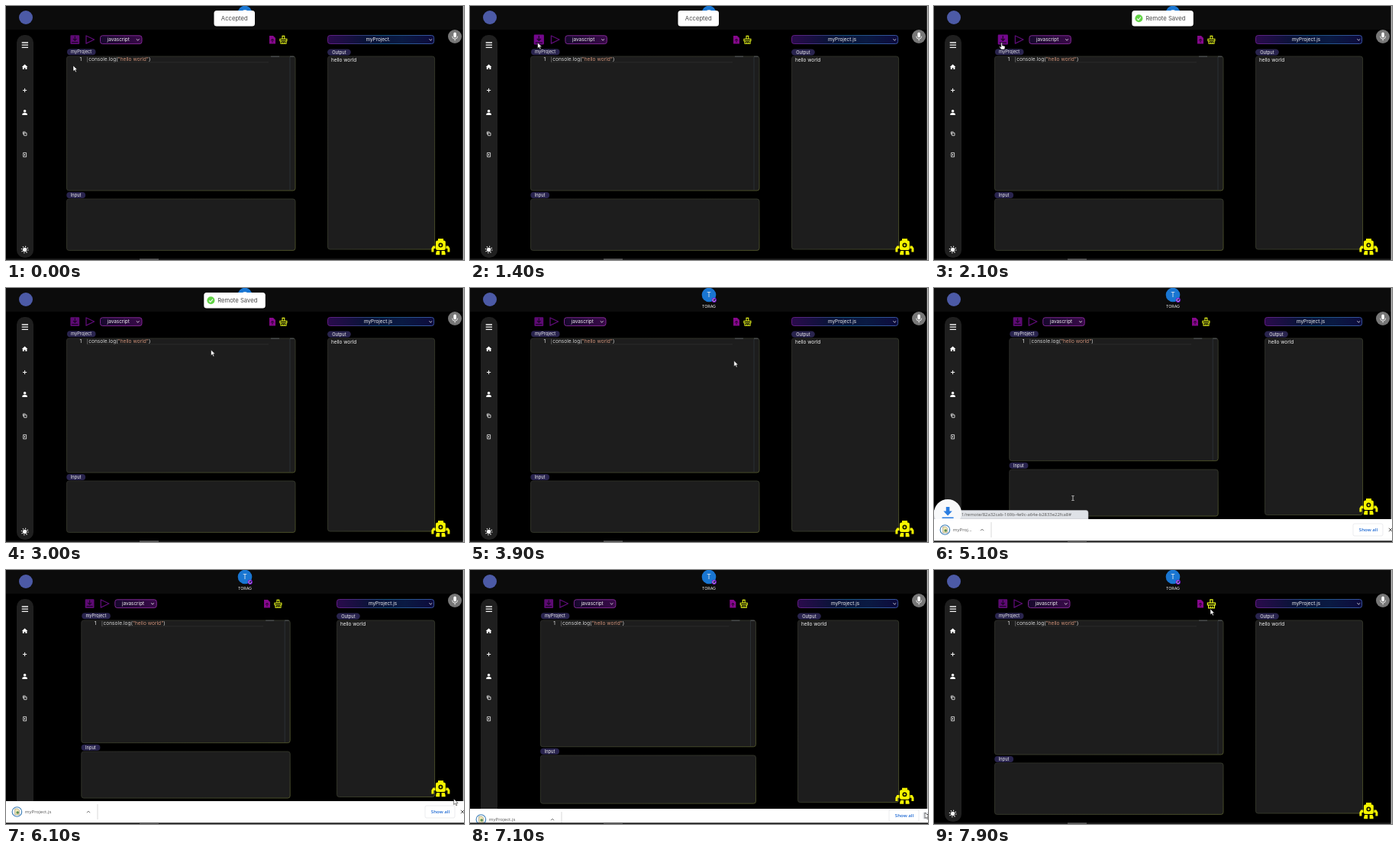
These frames come from a looping animation (600x333 px, 8 s). An HTML page:

```html
<!DOCTYPE html>
<html lang="en">
<head>
<meta charset="utf-8">
<title>Code playground</title>
<style>
html, body { margin: 0; width: 100%; height: 100%; overflow: hidden; background: #000; }
svg { display: block; width: 600px; height: 333px; }
text { font-family: Inter, sans-serif; font-size: 6.4px; fill: #f2f2f2; white-space: pre; }
.label { font-size: 5.7px; }
.toast { font-size: 7.7px; fill: #4a4a4a; }
.chrome { font-family: "Open Sans", sans-serif; font-size: 6.1px; fill: #555; }
.mid { text-anchor: middle; }
.panel { fill: #1d1d1d; stroke: url(#edge); stroke-width: .9; }
.pill { fill: #29244e; }
.line { fill: none; stroke: #f4f4f4; }
</style>
</head>
<body>
<svg viewBox="0 0 600 333" xmlns="http://www.w3.org/2000/svg">
<defs>
  <linearGradient id="edge" x1="0" y1="0" x2="1" y2="1">
    <stop offset="0" stop-color="#2c2c28"/><stop offset=".5" stop-color="#34372a"/><stop offset="1" stop-color="#50552a"/>
  </linearGradient>
  <linearGradient id="lang">
    <stop offset="0" stop-color="#16082c"/><stop offset="1" stop-color="#380a48"/>
  </linearGradient>
  <linearGradient id="file">
    <stop offset="0" stop-color="#2a0b4c"/><stop offset=".35" stop-color="#0a1338"/><stop offset=".7" stop-color="#0a1a42"/><stop offset="1" stop-color="#0d0b3c"/>
  </linearGradient>
  <linearGradient id="rim">
    <stop offset="0" stop-color="#6a1d8c"/><stop offset=".5" stop-color="#1c5c88"/><stop offset="1" stop-color="#3d5cae"/>
  </linearGradient>
</defs>
<rect width="600" height="333" fill="#000"/>
<rect width="600" height="31" fill="#0c0c0c"/>
<circle cx="26" cy="15" r="9" fill="#4c5aa6"/>

<g id="sidebar">
  <rect x="14" y="38" width="22" height="292" rx="10" fill="#1f1f1f"/>
  <path class="line" stroke-width="1.3" d="M20.7 48h8.3M20.7 51.2h8.3M20.7 54.4h8.3"/>
  <path fill="#fff" d="M24.6 76.6l3.8 3.4h-1v3h-2v-2h-1.6v2h-2v-3h-1z"/>
  <path class="line" stroke-width="1" d="M22 110.5h5.2M24.6 107.9v5.2"/>
  <circle cx="24.6" cy="137.7" r="1.8" fill="#fff"/>
  <path fill="#fff" d="M21.3 143v-1q0-2 3.3-2t3.3 2v1z"/>
  <path class="line" stroke-width=".8" d="M23.6 166.4h3.4v3.4h-3.4zM22.4 168.4v-3.4h3.2"/>
  <path class="line" stroke-width=".8" d="M22.6 194v-1.6h4v5.4h-4v-1.6M21.6 195.1h3.2M23.8 194l1.1 1.1-1.1 1.1"/>
  <circle cx="24.6" cy="319.4" r="2.6" fill="#fff"/>
  <circle class="line" cx="24.6" cy="319.4" r="4.1" stroke-width="1.5" stroke-dasharray="1.1 2.12"/>
</g>

<g id="user">
  <circle cx="313" cy="9" r="9.3" fill="#1976d2"/>
  <text class="mid" x="313" y="12" style="font-size:8.5px">T</text>
  <circle cx="319.8" cy="15.8" r="3.1" fill="#7b16d6"/>
  <circle cx="319.8" cy="15.8" r="1.7" fill="#201048" stroke="#e6d4ff" stroke-width=".8" stroke-dasharray="8 2.7"/>
  <text class="mid" x="313" y="26" style="font-size:5.3px">TORAG</text>
</g>

<circle cx="588" cy="40" r="9" fill="#777"/>
<rect x="586.3" y="34.6" width="3.6" height="6.8" rx="1.8" fill="#fff"/>
<path class="line" stroke-width=".9" d="M584.6 39.6q0 3.6 3.5 3.6t3.5-3.6M588.1 43.2v2.4"/>

<g id="tools">
  <g id="save">
    <path id="saveBox" fill="#5e0a74" d="M85.4 38.3h9.8q1 0 1 1v9.6q0 1-1 1h-9.8q-1 0-1-1v-9.6q0-1 1-1z"/>
    <path fill="none" stroke="#1a0524" stroke-width="1.1" d="M90.3 39.6v5.4M88 43l2.3 2.3 2.3-2.3M86.2 47.6h8.2"/>
  </g>
  <g id="run">
    <path fill="none" stroke="#5d0c76" stroke-width="1.3" stroke-linejoin="round" d="M105 39l10.6 5-10.6 5.2z"/>
    <rect x="123.5" y="38.8" width="54.5" height="10.8" rx="3" fill="url(#lang)" stroke="#8a2a9c" stroke-width=".9"/>
    <text x="132.6" y="46.3">javascript</text>
    <path class="line" stroke-width=".8" d="M170.8 43.4l1.9 1.7 1.9-1.7"/>
  </g>
</g>
<g id="actions">
  <path fill="#86088c" d="M345 39h5l3 3v7.4h-8z"/>
  <path fill="none" stroke="#1c0320" stroke-width="1" d="M349 47.6v-4M347 45.3l2-2 2 2"/>
  <g id="broom" fill="none" stroke="#e4f31c" stroke-width="1.1">
    <path d="M362 43v-3.6h2.8v3.6M358.9 43.2h9v2.6h-9zM360 46v3.2h7v-3.2M362.4 49v-1.6M364.7 49v-1.6"/>
  </g>
</g>
<rect id="fileBox" y="38.5" height="11" rx="3" fill="url(#file)" stroke="url(#rim)" stroke-width=".9"/>
<text id="fileName" class="mid" y="46.2"></text>
<path class="line" stroke-width=".8" d="M554.4 43.4l1.9 1.7 1.9-1.7"/>

<rect id="editor" class="panel" y="66" rx="3"/>
<g id="code">
  <rect class="pill" x="80" y="56.2" width="37.5" height="8" rx="4"/>
  <text class="label mid" x="98.6" y="62.2">myProject</text>
  <text x="96.5" y="72.3">1</text>
  <text x="108.2" y="72.3" style="font-size:6.6px;fill:#d8d8d8">console.log(<tspan fill="#ce9178">"hello world"</tspan>)</text>
  <path d="M106.6 66.8v7" stroke="#8a8a8a" stroke-width=".6"/>
</g>
<path id="row" fill="none" stroke="#323232" stroke-width=".7"/>
<path id="ruler" fill="none" stroke="#333a40" stroke-width=".7"/>
<path id="mini" fill="none" stroke="#62666c" stroke-width=".8"/>

<rect id="input" class="panel" rx="3"/>
<g id="inputTag">
  <rect class="pill" x="79.3" y="244" width="24.8" height="8" rx="4"/>
  <text class="label mid" x="91.6" y="250">Input</text>
</g>
<rect id="output" class="panel" y="66" rx="3"/>
<g id="outputTag">
  <rect class="pill" x="421" y="56.4" width="30.8" height="8.4" rx="4.2"/>
  <text class="label mid" x="436.4" y="62.6">Output</text>
  <text x="426" y="73.4">hello world</text>
</g>

<g id="robot" fill="#f6f600">
  <path d="M566 305h7v3h-7z"/>
  <rect x="563" y="307.6" width="12.8" height="12.4" rx="2"/>
  <circle cx="569.4" cy="313.6" r="3" fill="#151500"/>
  <circle cx="569.4" cy="313.6" r="1.3"/>
  <path d="M559.4 314.4h3v3.6h-2v4.4h-3v-4.6zM579.4 314.4h-3v3.6h2v4.4h3v-4.6zM564.2 321h4v5.2h-5v-2.4zM570.6 321h4l1 2.8v2.4h-5z"/>
</g>

<g id="accepted">
  <rect x="272.5" y="6" width="53.5" height="20.6" rx="3.5" fill="#fff"/>
  <text class="toast mid" x="299.3" y="19">Accepted</text>
</g>
<g id="saved">
  <rect x="259.3" y="6" width="80.5" height="20.6" rx="3.5" fill="#fff"/>
  <circle cx="268.4" cy="16.3" r="5" fill="#61d345"/>
  <path class="line" stroke-width="1.2" d="M266 16.5l1.8 1.8 3.2-3.7"/>
  <text class="toast" x="277.2" y="19">Remote Saved</text>
</g>

<g id="status">
  <path d="M0 321.5h199q3 0 3 3v8.500h-202z" fill="#dfe2e7" stroke="#b5b8bd" stroke-width=".6"/>
  <text class="chrome" x="180" y="329.4" text-anchor="end" style="font-size:5.9px">localhost/1/remote/82a32cab-169b-4e9c-a64e-b2833e22fca8#</text>
</g>
<circle id="dropDisc" cx="18" cy="295" r="18" fill="#f8f9fa"/>
<g id="shelf">
  <rect y="303" width="600" height="32" fill="#fff"/>
  <circle cx="14.4" cy="317" r="6.3" fill="none" stroke="#3d7fb8" stroke-width="1.1"/>
  <path d="M11.6 313h4l1.800 1.800v6.200h-5.800z" fill="#f3e9b4" stroke="#77746a" stroke-width=".5"/>
  <circle cx="15.2" cy="318" r="1.8" fill="#5b8f58"/>
  <text id="item" class="chrome" x="24.8" y="319.200"></text>
  <g id="itemEnd">
    <path d="M106 318.200l2-2 2 2" fill="none" stroke="#555" stroke-width=".9"/>
    <path d="M120 307v20" stroke="#d0d0d0" stroke-width=".8"/>
  </g>
</g>
<g id="shelfEnd">
  <rect x="549" y="309" width="39" height="16" rx="2" fill="#fff" stroke="#e2e4e8" stroke-width=".7"/>
  <text class="chrome mid" x="569" y="319.200" style="fill:#1a66d2;font-weight:600">Show all</text>
  <rect id="closeHover" x="593.500" y="312.500" width="8" height="9" rx="1" fill="#dcdee2"/>
  <path d="M595.800 314.800l4.400 4.400M600.200 314.800l-4.400 4.400" stroke="#444" stroke-width=".9"/>
</g>
<path id="dropArrow" fill="#2a7de1" d="M15.800 287h4.600v5.600h3.400l-5.700 6-5.700-6h3.400zM10.600 300.600h15v1.500h-15z"/>

<rect y="331.300" width="600" height="1.700" fill="#1f1f1f"/>
<rect x="175" y="331.300" width="25" height="1.700" fill="#5a5a5a"/>
<rect id="scroll" x="598.700" width="1.300" height="331" fill="#c4c4c4"/>

<g id="cursor">
  <path id="arrow" d="M0 0v7.600l1.800-1.600 1.300 2.800 1.300-.6-1.300-2.700h2.400z" fill="#fff" stroke="#000" stroke-width=".5"/>
  <path id="hand" d="M-.8.6q.8-1 1.600 0v3.200l3 .7q.8.3.7 1.300l-.6 3.200h-4.300l-2.600-3.200q.4-1.200 1.500-.4l.7.600z" fill="#fff" stroke="#000" stroke-width=".5"/>
  <path id="beam" d="M-1.600-3h1.200l.4.400.4-.4h1.200M0-2.600v5.200M-1.600 3h1.200l.4-.4.4.4h1.200" fill="none" stroke="#e8e8e8" stroke-width=".8"/>
</g>
</svg>
<script>
const LOOP = 8000, STEP = 100;
const el = id => document.getElementById(id);
const set = (id, attrs) => { for (const k in attrs) el(id).setAttribute(k, attrs[k]); };
const move = (id, x, y) => set(id, { transform: `translate(${x} ${y})` });
const show = (id, on) => set(id, { opacity: +on });
const mix = (a, b, p) => a + (b - a) * p;
const ramp = (t, a, b) => Math.min(1, Math.max(0, (t - a) / (b - a)));
const ease = p => p * p * (3 - 2 * p);
const during = (t, a, b) => t >= a && t < b;

// time, x, y, pointer shape
const path = [
  [0, 88, 78, 'arrow'], [200, 88, 78, 'arrow'], [800, 88.6, 48, 'hand'],
  [2300, 88.6, 48, 'hand'], [3400, 345.8, 95.3, 'arrow'], [4000, 345.8, 95.3, 'arrow'],
  [4300, 349, 45, 'hand'], [4700, 349, 45, 'hand'], [5050, 182, 275.5, 'beam'],
  [5300, 182, 275.5, 'beam'], [6100, 586.6, 300, 'arrow'], [6500, 596, 318, 'arrow'],
  [7200, 596, 318, 'arrow'], [7600, 440, 120, 'arrow'], [7850, 362, 51, 'hand'], [LOOP, 362, 51, 'hand']
];

function pointer(t) {
  const i = path.findIndex(k => k[0] > t), a = path[i - 1], b = path[i];
  const p = ease(ramp(t, a[0], b[0]));
  const shape = p > .88 ? b[3] : a[3] === 'hand' && p > .02 ? 'arrow' : a[3];
  move('cursor', mix(a[1], b[1], p), mix(a[2], b[2], p));
  for (const s of ['arrow', 'hand', 'beam']) show(s, s === shape);
}

function box(id, x1, y1, x2, y2) {
  set(id, { x: x1, y: y1, width: x2 - x1, height: y2 - y1 });
}

function layout(k) {
  const left = mix(79.5, 98.8, k), right = mix(379, 372.2, k), out = mix(421.5, 433.5, k);
  const dx = left - 79.5;
  box('editor', left, 66, right, mix(242, 226.6, k));
  box('input', left, mix(253, 238, k), right, mix(320.4, 299, k));
  box('output', out, 66, 561.6, mix(319, 297.5, k));
  set('fileBox', { x: out, width: 560.6 - out });
  set('fileName', { x: (out + 561) / 2 - 3.7 });
  move('tools', dx, 0);
  move('code', dx, 0);
  move('inputTag', dx, -15.2 * k);
  move('outputTag', out - 421.5, 0);
  move('actions', -7 * k, 0);
  move('robot', 0, -29 * k);
  set('row', { d: `M${left + 27} 73.8H${right - 35}` });
  set('ruler', { d: `M${right - 7} 67V${mix(241, 226, k)}` });
  set('mini', { d: `M${right - 32} 66.2h11M${right - 7} 66.2h5.500` });
}

function shelf(t, k) {
  const top = 333 - 30 * k;
  move('shelf', 0, top - 303);
  move('shelfEnd', 0, (top - 303) / 2);
  show('shelf', k > 0);
  show('shelfEnd', k > 0);
  show('closeHover', during(t, 6450, 7300));
  const wide = ramp(t, 5200, 5400);
  el('item').textContent = wide < 1 ? 'myProj...' : 'myProject.js';
  move('itemEnd', -45 * (1 - wide), 0);
  move('status', 0, -30 * k);
  show('status', during(t, 4300, 5200));
  const glow = ramp(t, 4950, 5050) * (1 - ramp(t, 5300, 5700));
  const drop = 6 * ramp(t, 5100, 5700);
  set('dropDisc', { opacity: glow });
  set('dropArrow', { opacity: glow, transform: `translate(0 ${drop})` });
  set('scroll', { height: top });
}

function toast(id, shown) {
  set(id, { opacity: shown, transform: `translate(0 ${-28 * (1 - shown)})` });
}

function grow(id, on, cx, cy) {
  set(id, { transform: on ? `translate(${cx} ${cy}) scale(1.12) translate(${-cx} ${-cy})` : '' });
}

function draw(t) {
  const k = ramp(t, 4950, 5080) * (1 - ramp(t, 7000, 7300));
  const overSave = during(t, 700, 2400);
  layout(k);
  shelf(t, k);
  el('fileName').textContent = 'myProject.js'.slice(0, 10 + Math.min(2, Math.floor(t / 100)));
  grow('save', overSave, 90.3, 44);
  set('saveBox', { fill: overSave ? '#74088c' : '#5e0a74' });
  move('run', overSave ? 1.4 : 0, 0);
  grow('broom', t >= 7750, 363.4, 44.3);
  toast('accepted', 1 - ease(ramp(t, 1400, 1700)));
  toast('saved', ease(ramp(t, 1500, 1800)) * (1 - ease(ramp(t, 3400, 3700))));
  pointer(t);
}

function tick(now) {
  draw(Math.floor(now % LOOP / STEP) * STEP);
  requestAnimationFrame(tick);
}
draw(0);
requestAnimationFrame(tick);
</script>
</body>
</html>
```
